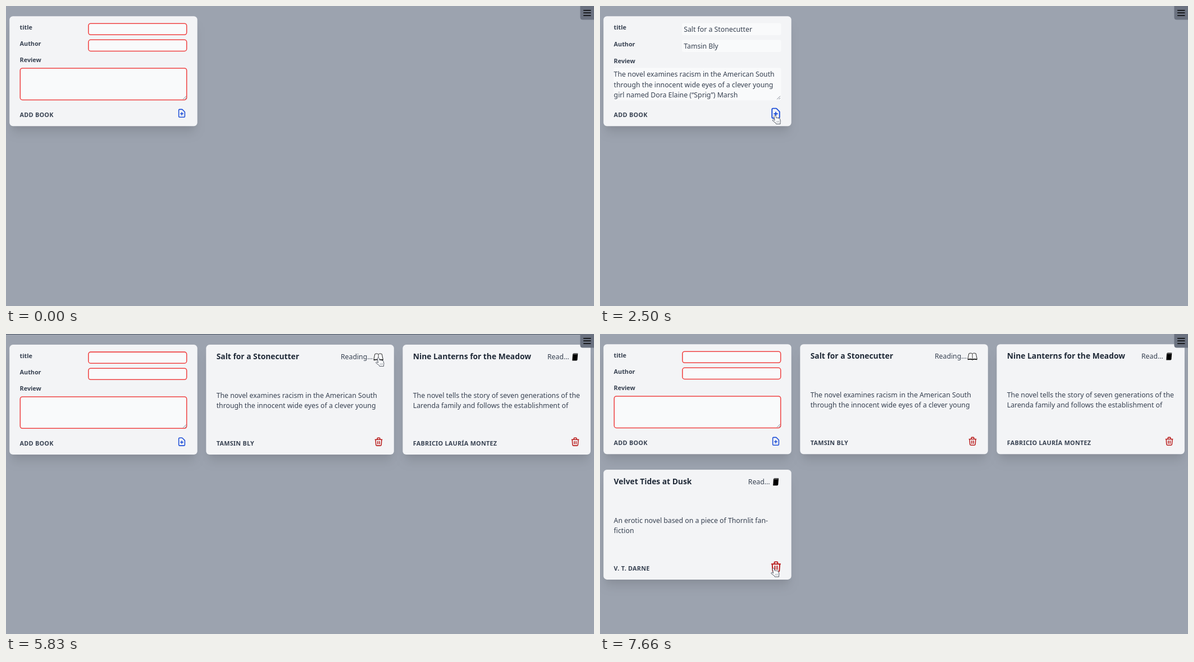
Write an HTML page that moves like this. It is 1047 by 535 pixels and loops after 8000 ms.

```html
<!DOCTYPE html>
<html lang="en">
<head>
<meta charset="utf-8">
<title>Book list</title>
<style>
  html, body { margin: 0; width: 100%; height: 100%; overflow: hidden; background: #9ca3af; }
  svg { display: block; width: 100vw; height: 100vh; }
  text { font: 12.27px "Noto Sans", sans-serif; fill: #374151; white-space: pre; }
  .title { font-size: 13.8px; font-weight: 700; fill: #1f2937; }
  .label { font-size: 10.8px; font-weight: 700; }
  .caps { letter-spacing: .025em; }
  .icon { fill: none; stroke-width: 2; stroke-linecap: round; stroke-linejoin: round; }
</style>
</head>
<body>
<svg id="stage" viewBox="0 0 1047 535">
  <defs>
    <filter id="soft" x="-20%" y="-30%" width="140%" height="160%"><feGaussianBlur stdDeviation="9.6"/></filter>
    <filter id="tight" x="-20%" y="-30%" width="140%" height="160%"><feGaussianBlur stdDeviation="3.85"/></filter>
  </defs>
  <rect width="1047" height="535" fill="#9ca3af"/>
</svg>
<script>
const LOOP = 8000;
const REM = 0.77;
const COL = [6.2, 356.3, 706.4];
const ROW = [18.2, 241.9];
const CARD = { w: 334.5, h: 196 };

const ICONS = {
  add: ['#1d4ed8', 'M9 13h6m-3-3v6m5 5H7a2 2 0 01-2-2V5a2 2 0 012-2h5.586a1 1 0 01.707.293l5.414 5.414a1 1 0 01.293.707V19a2 2 0 01-2 2z'],
  trash: ['#b91c1c', 'M19 7l-.867 12.142A2 2 0 0116.138 21H7.862a2 2 0 01-1.995-1.858L5 7m5 4v6m4-6v6m1-10V4a1 1 0 00-1-1h-4a1 1 0 00-1 1v3M4 7h16'],
  menu: ['#000', 'M4 6h16M4 12h16M4 18h16']
};

const BOOKS = {
  salt: {
    title: 'Salt for a Stonecutter', author: 'Tamsin Bly', open: true,
    lines: ['The novel examines racism in the American South', 'through the innocent wide eyes of a clever young']
  },
  nine: {
    title: 'Nine Lanterns for the Meadow', author: 'Fabricio Lauría Montez',
    lines: ['The novel tells the story of seven generations of the', 'Larenda family and follows the establishment of']
  },
  velvet: {
    title: 'Velvet Tides at Dusk', author: 'V. T. Darne',
    lines: ['An erotic novel based on a piece of Thornlit fan-', 'fiction']
  }
};

const text = (x, y, s, cls = '') => `<text x="${x}" y="${y}" class="${cls}">${s}</text>`;

const rect = (x, y, w, h, r, attrs) =>
  `<rect x="${x}" y="${y}" width="${w}" height="${h}" rx="${r}" ${attrs}/>`;

const at = (x, y, body) => `<g transform="translate(${x} ${y})">${body}</g>`;

function icon(name, x, y, zoom = 1) {
  const [color, d] = ICONS[name];
  return `<path class="icon" stroke="${color}" d="${d}" transform="translate(${x} ${y}) scale(${REM * zoom}) translate(-12 -12)"/>`;
}

function card(x, y, body) {
  const { w, h } = CARD;
  const shade = (dy, filter, alpha) =>
    rect(3.85, dy + 3.85, w - 7.7, h - 7.7, 4, `fill="#000" fill-opacity="${alpha}" filter="url(#${filter})"`);
  return at(x, y, shade(15.4, 'soft', .1) + shade(7.7, 'tight', .04) +
    rect(0, 0, w, h, 6.2, 'fill="#f3f4f6"') + body);
}

// Empty fields get a red outline; filled ones have none.
function field(x, y, w, h, filled) {
  return filled
    ? rect(x, y, w, h, 3, 'fill="#f9fafb"')
    : rect(x + .8, y + .8, w - 1.6, h - 1.6, 4, 'fill="#f9fafb" stroke="#ef4444" stroke-width="1.55"');
}

function form(dy = 0, entry = null) {
  const f = !!entry;
  const grip = '<path d="M309 148.2l5.8-5.8M312.4 148.2l2.4-2.4" stroke="#6b7280" stroke-width=".9"/>';
  let s = text(18.4, 23.7, 'title', 'label') +
    text(18.4, f ? 53.7 : 52.8, 'Author', 'label') +
    text(18.4, f ? 84.2 : 82, 'Review', 'label') +
    field(139.8, 12.2, 176.5, 21.7, f) +
    field(139.8, f ? 42 : 41.3, 176.5, 21.7, f) +
    field(18.3, 92, 298, 58, f) + grip;
  if (f) {
    s += text(143, 27.6, entry.title) + text(143, 57.4, entry.author);
    entry.lines.forEach((line, i) => s += text(18.4, 108 + i * 18.48, line));
  }
  s += text(18.4, 179.9, 'ADD BOOK', 'label caps') + icon('add', 306.8, 173.1, f ? 1.25 : 1);
  return card(COL[0], ROW[0] + dy, s);
}

const openBook = `<g fill="#f9fafb" stroke="#111" stroke-width=".9" stroke-linejoin="round">
  <path d="M2.8 1.2Q7 -.6 9 1.8Q11 -.6 15.2 1.2L17.3 11.2Q11 9.8 9 11.8Q7 9.8 .7 11.2Z"/>
  <path d="M9 1.8V11.6" stroke-width=".8"/>
  <path d="M.7 12Q7 10.7 9 12.5Q11 10.7 17.3 12" fill="none" stroke-width="1.1"/></g>`;

const closedBook = `<path d="M2.2 1.8L3.5 .5H11.3L10.4 12.4L9 13.5H1.3Z" fill="#000"/>
  <path d="M2.7 2H9.9L10.7 1" fill="none" stroke="#e5e7eb" stroke-width=".6"/>
  <path d="M2.1 2.4L1.3 12.6" stroke="#777" stroke-width=".6"/>`;

function book(b, col, row, dy = 0, zoom = 1) {
  const state = b.open
    ? text(239.7, 26.1, 'Reading...') + at(297.8, 15.5, openBook)
    : text(257.6, 26.1, 'Read...') + at(300.6, 14.8, closedBook);
  return card(COL[col], ROW[row] + dy,
    text(18.4, 26.1, b.title, 'title') + state +
    b.lines.map((line, i) => text(18.4, 94.8 + i * 18.48, line)).join('') +
    text(18.4, 179.9, b.author.toUpperCase(), 'label caps') +
    icon('trash', 307.2, 173.1, zoom));
}

const hand = (x, y) => at(x, y, `<path d="M4.3 1.2Q5.6 .2 6.4 1.6L7.5 5.6Q8.8 4.8 9.7 5.8Q11 5 11.9 6.2Q13.5 5.6 14.1 7.3
  L15.1 11.2Q15.3 12.6 14.7 13.6V16.4H7.3L6.7 14.7L1.3 10.7Q.2 9.2 1.8 8.7Q3 8.6 4.8 10.1L3.6 2.9Q3.4 1.7 4.3 1.2Z"
  fill="#f9fafb" stroke="#555b66" stroke-width="1" stroke-linejoin="round"/>
  <path d="M8.6 11.2V14M10.6 11V14M12.6 10.8V13.8" stroke="#8b919b" stroke-width=".7"/>`);

const menu = '<path d="M1022.4 0H1047V24.6H1027Q1022.4 24.6 1022.4 20Z" fill="#6b7280"/>' + icon('menu', 1034.8, 12.3);

const draft = {
  title: BOOKS.salt.title, author: BOOKS.salt.author,
  lines: [...BOOKS.salt.lines, 'girl named Dora Elaine (“Sprig”) Marsh']
};

const scenes = [
  [0, form()],
  [500, form(0, draft) + hand(306.3, 194)],
  [3830, '<rect width="1047" height="1" fill="#4b5563"/>' +
    form(.9) + book(BOOKS.salt, 1, 0, .9) + book(BOOKS.nine, 2, 0, .9) + hand(657.8, 41.2)],
  [7160, form() + book(BOOKS.salt, 1, 0) + book(BOOKS.nine, 2, 0) +
    book(BOOKS.velvet, 0, 1, 0, 1.25) + hand(303.8, 416.6)]
];

const stage = document.getElementById('stage');
const groups = scenes.map(([, body]) => {
  const g = document.createElementNS(stage.namespaceURI, 'g');
  g.innerHTML = body + menu;
  return stage.appendChild(g);
});

function draw(t) {
  const now = scenes.filter(([start]) => start <= t).length - 1;
  groups.forEach((g, i) => g.style.display = i === now ? '' : 'none');
}

const begin = performance.now();
function tick() {
  draw((performance.now() - begin) % LOOP);
  requestAnimationFrame(tick);
}
tick();
</script>
</body>
</html>
```
